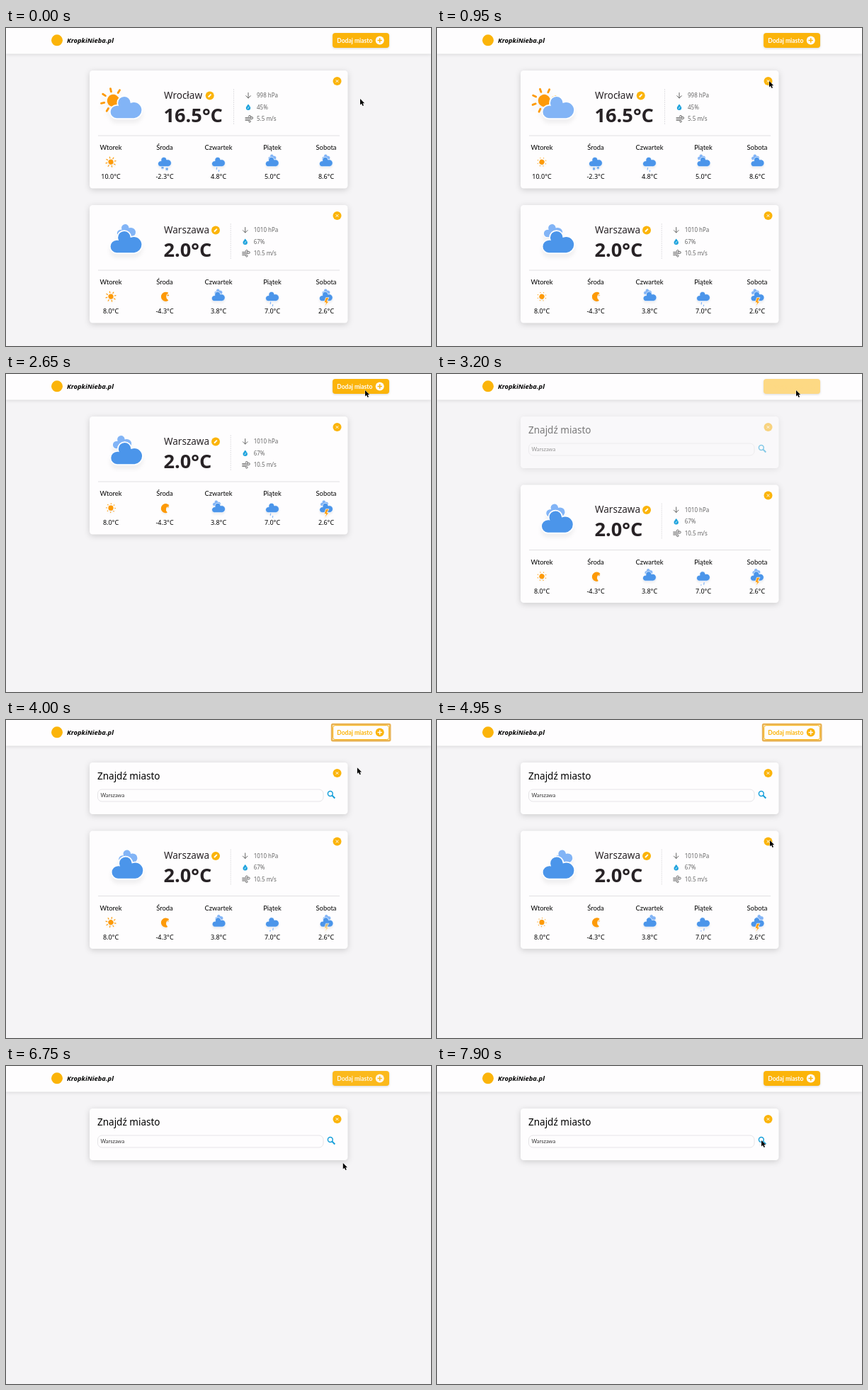
Animation of 600x449 px, one loop 8000 ms. Source, as an HTML page:

```html
<!DOCTYPE html>
<html lang="pl">
<head>
<meta charset="utf-8">
<title>Pogoda</title>
<style>
  html, body { margin: 0; width: 100%; height: 100%; overflow: hidden; background: #f5f4f6; }
  svg { display: block; width: 600px; height: 449px; }
  text { font-family: "Noto Sans", sans-serif; fill: #000; }
  .lato { font-family: Lato, sans-serif; }
  .panel { fill: #fefdfe; filter: drop-shadow(0 2px 4px rgba(0, 0, 0, .16)); }
  .head { font-size: 13.5px; }
  .big { font-size: 27.2px; font-weight: 600; fill: #272225; }
  .stat { font-size: 8px; fill: #666; }
  .day { font: 9.4px Lato, sans-serif; text-anchor: middle; }
  .temp { font-size: 9px; font-weight: 500; text-anchor: middle; }
  .rule { stroke: #e1e0e3; }
  .soft { filter: drop-shadow(0 4px 2px rgba(0, 0, 0, .05)); }
  .line { fill: none; stroke: #666; stroke-linecap: round; stroke-linejoin: round; }
</style>
</head>
<body>
<svg id="stage" viewBox="0 0 600 449"></svg>
<script>
const LOOP = 8000, STEP = 50;
const REMOVE_FIRST = 1300, OPEN_FORM = 3050, REMOVE_LAST = 6500, FADE = 300;
const AMBER = '#fbb40a', ORANGE = '#fd9a08', BLUE = '#4b95ea', PALE = '#82b4f6';

const CURSOR = [ // time, x, y
  [0, 500, 100], [100, 500, 100], [850, 469, 75], [1500, 469, 75], [1800, 474, 78],
  [2000, 474, 78], [2600, 507, 23], [3600, 507, 23], [4700, 470, 170], [5000, 470, 170],
  [5300, 468, 172], [6600, 468, 172], [6850, 480, 118], [7200, 546, 55],
  [7500, 505, 19], [7650, 505, 19], [7850, 458, 105], [8000, 458, 105]
];

// Icons are drawn on a 64-unit square.
const CLOUD = 'M47.7 35.4c0-4.6-3.7-8.2-8.2-8.2-1 0-1.9.2-2.8.5-.3-3.4-3.1-6.2-6.6-6.2-3.7 0-6.7 3-6.7 6.7 0 .8.2 1.6.4 2.3-.3-.1-.7-.1-1-.1-3.7 0-6.7 3-6.7 6.7 0 3.6 2.9 6.6 6.5 6.7h17.2c4.4-.5 7.9-4 7.9-8.4z';
const MOON = 'M14.5 13.2c0-3.7 2-6.9 5-8.7-1.5-.9-3.2-1.3-5-1.3-5.5 0-10 4.5-10 10s4.5 10 10 10c1.8 0 3.5-.5 5-1.3-3-1.7-5-5-5-8.7z';

const cloud = (fill, cls = '') =>
  `<g class="${cls}"><path d="${CLOUD}" transform="translate(0 -1)" fill="${fill}" stroke="#fff" stroke-width="1.2"/></g>`;
const backCloud = `<g class="back"><path d="${CLOUD}" transform="translate(10 1) scale(.6)" fill="${PALE}" stroke="#fff" stroke-width="1.2"/></g>`;

function sun(x, y, rayClass = '') {
  const rays = Array.from({ length: 8 }, (_, i) =>
    `<path class="${rayClass}" d="M0 9v3" transform="rotate(${i * 45})"/>`).join('');
  return `<g transform="translate(${x} ${y})"><g class="spin" stroke="${ORANGE}" stroke-width="2" stroke-linecap="round"><circle r="5" fill="${ORANGE}"/>${rays}</g></g>`;
}

const drop = (x, shift) =>
  `<path class="rain" data-shift="${shift}" d="M${x} 0v8" stroke="${PALE}" stroke-width="2" stroke-linecap="round" stroke-dasharray="4 7"/>`;
const flake = (x, delay) =>
  `<g transform="translate(${x} 45)"><path class="snow" data-delay="${delay}" d="M0-3V3M-2.6-1.5L2.6 1.5M-2.6 1.5L2.6-1.5" stroke="${BLUE}" stroke-width="1.4" stroke-linecap="round"/></g>`;

const ICONS = {
  sunny: sun(32, 32, 'ray'),
  partly: sun(19, 25) + cloud(PALE, 'front'),
  cloudy: backCloud + cloud(BLUE, 'front'),
  rainy: `<g transform="translate(34 46) rotate(10)">${drop(-6, 0)}${drop(0, 5)}</g>` + cloud(BLUE),
  snowy: flake(27, 0) + flake(37, 1200) + cloud(BLUE),
  night: `<g transform="translate(20 19)"><g class="moon"><path d="${MOON}" fill="${ORANGE}" stroke="${ORANGE}" stroke-width="2" stroke-linejoin="round"/></g>
    <path class="star" d="M20 7l.9 2 2 .9-2 .9-.9 2-.9-2-2-.9 2-.9z" fill="${ORANGE}"/></g>`,
  storm: backCloud + cloud(BLUE, 'front') +
    `<path class="bolt" d="M14.3-2.9h6.2l-4.1 7.2h3.9l-8.8 10.3 3.4-7.7h-3.8z" transform="translate(14 38) scale(1.2)" fill="${ORANGE}" stroke="#fff"/>`
};

const icon = (name, x, y, scale) =>
  `<g class="soft" transform="translate(${x} ${y}) scale(${scale})">${ICONS[name]}</g>`;

const closeButton = y =>
  `<circle cx="467.5" cy="${y}" r="6" fill="${AMBER}"/><path d="M465.7 ${y - 1.8}l3.6 3.6m0-3.6l-3.6 3.6" stroke="#fff"/>`;

function stats(x, values) {
  const rows = values.map((v, i) => `<text class="stat" x="${x + 12}" y="${38 + i * 16.5}">${v}</text>`).join('');
  return `<g class="line"><path d="M${x} 31.5v7.5m-3.3-3.3l3.3 3.3 3.3-3.3"/>
    <path d="M${x - 4} 66.5h6a1.5 1.5 0 1 0-1.5-1.5M${x - 4} 68.5h9a1.5 1.5 0 1 0-1.5-1.5M${x - 4} 70.5h6a1.3 1.3 0 1 1-1.3 1.3"/></g>
    <path d="M${x} 47.5c1.6 2.3 3.2 3.7 3.2 5.3a3.2 3.2 0 0 1-6.4 0c0-1.6 1.6-3 3.2-5.3z" fill="#18a0dc"/>
    <path d="M${x - 1.2} 54.3l2.4-3.2m-2.4.2h.3m1.8 2.8h.3" stroke="#fff" stroke-width=".8"/>${rows}`;
}

const DAYS = ['Wtorek', 'Środa', 'Czwartek', 'Piątek', 'Sobota'];

function card(id, c) {
  const days = c.days.map(([name, temp], i) => {
    const x = 148 + i * 76;
    return `<text class="day" x="${x}" y="112">${DAYS[i]}</text>${icon(name, x - 19.2, 110, .6)}
      <text class="temp" x="${x}" y="153">${temp}°C</text>`;
  }).join('');
  return `<g id="${id}"><rect class="panel" x="118" width="364.5" height="166.5" rx="4.5"/>
    ${icon(c.icon, 124, 6.5, 1.44)}
    <text class="head" x="223" y="39.5" style="fill:#272225">${c.city}</text>
    <circle cx="${c.edit}" cy="35.5" r="6" fill="${AMBER}"/>
    <path d="M${c.edit - 2} 37.5l3.8-3.8" stroke="#fff" stroke-width="1.9"/>
    <text class="big" x="222.5" y="72.5">${c.temp}°C</text>
    <path class="rule" d="M${c.split} 26v51" stroke-dasharray="2 1"/>
    <path class="rule" d="M130 92h341"/>
    ${stats(c.split + 20.5, c.stats)}${days}${closeButton(15)}</g>`;
}

const stage = document.getElementById('stage');
stage.innerHTML = `
  <rect width="600" height="449" fill="#f5f4f6"/>
  <rect width="600" height="36.5" fill="#fefdfe" style="filter:drop-shadow(0 1px 2px rgba(0,0,0,.12))"/>
  <circle cx="72" cy="17.3" r="8" fill="${AMBER}"/>
  <text x="86" y="20.8" style="font-size:9.4px;font-weight:600;font-style:italic">KropkiNieba.pl</text>
  <g style="filter:drop-shadow(0 1px 1.5px rgba(0,0,0,.14))"><rect id="btn" x="461" y="7" width="80" height="21" rx="4"/></g>
  <g id="ring" fill="none"><rect x="460" y="6" width="82.3" height="23.3" rx="1.5" stroke="#e9b354" stroke-width="2.4"/>
    <rect x="461.7" y="7.7" width="78.9" height="19.9" rx="3" stroke="${AMBER}"/></g>
  <text id="label" class="lato" x="467.3" y="20.6" style="font-size:8.5px;font-weight:700">Dodaj miasto</text>
  <circle id="disc" cx="527.7" cy="17.5" r="6"/>
  <path id="plus" d="M524.5 17.5h6.4m-3.2-3.2v6.4" stroke-width="1.5"/>
  <g id="form">
    <rect class="panel" x="118" y="60" width="364.5" height="73" rx="4.5"/>
    <text class="head" x="129" y="83.5">Znajdź miasto</text>
    <rect x="129.5" y="98" width="318.5" height="17" rx="6" fill="#fefdfe" stroke="#dfdee1" stroke-width=".8"/>
    <text class="lato" x="133.5" y="109.2" style="font-size:7.5px;fill:#333">Warszawa</text>
    <g fill="none" stroke="#159fda" stroke-width="1.5"><circle cx="457.8" cy="104" r="3.4"/><path d="M460.3 106.5l4 4" stroke-width="1.9"/></g>
    ${closeButton(75)}
  </g>
  ${card('first', {
    city: 'Wrocław', temp: '16.5', icon: 'partly', edit: 287.7, split: 321.5,
    stats: ['998 hPa', '45%', '5.5 m/s'],
    days: [['sunny', '10.0'], ['snowy', '-2.3'], ['rainy', '4.8'], ['cloudy', '5.0'], ['cloudy', '8.6']]
  })}
  ${card('last', {
    city: 'Warszawa', temp: '2.0', icon: 'cloudy', edit: 296, split: 317.2,
    stats: ['1010 hPa', '67%', '10.5 m/s'],
    days: [['sunny', '8.0'], ['night', '-4.3'], ['cloudy', '3.8'], ['rainy', '7.0'], ['storm', '2.6']]
  })}
  <path id="cursor" d="M0 0v8.6l2-1.8 1.5 3.2 1.5-.7-1.5-3.1h2.7z" fill="#000" stroke="#fff" stroke-width=".7" paint-order="stroke"/>`;

const el = id => document.getElementById(id);
const set = (node, name, value) => node.setAttribute(name, value);
const parts = {};
for (const cls of ['back', 'front', 'spin', 'ray', 'rain', 'snow', 'moon', 'star', 'bolt'])
  parts[cls] = [...stage.querySelectorAll('.' + cls)];

const clamp = v => Math.min(1, Math.max(0, v));
const ease = v => { v = clamp(v); return v * v * (3 - 2 * v); };
// 0 at the start of each period, 1 halfway through it
const swing = (t, period) => 1 - Math.abs(1 - 2 * ((t / period % 1 + 1) % 1));
const show = (node, on) => set(node, 'visibility', on ? 'visible' : 'hidden');
const blend = (a, b, p) => `rgb(${a.map((v, i) => Math.round(v + (b[i] - v) * p))})`;

function drawIcons(t) {
  const each = (cls, fn) => parts[cls].forEach(fn);
  each('back', n => set(n, 'transform', `translate(${-5 + 15 * swing(t - 1800, 7000)} 0)`));
  each('front', n => set(n, 'transform', `translate(${2 * swing(t, 3000) - .3} 0)`));
  each('spin', n => set(n, 'transform', `rotate(${t / 25 - 13})`));
  const glow = ease(swing(t, 2000));
  each('ray', n => {
    set(n, 'stroke-dasharray', `${3 - 2.9 * glow} 10`);
    set(n, 'stroke-dashoffset', -glow);
  });
  each('rain', n => set(n, 'stroke-dashoffset', -t / 80 - n.dataset.shift));
  each('snow', n => {
    const p = (t + +n.dataset.delay) % 2000 / 2000;
    set(n, 'transform', `translate(${1.4 * Math.sin(p * 5)} ${6 * p})`);
    set(n, 'opacity', clamp((1 - p) * 3));
  });
  each('moon', n => set(n, 'transform', `rotate(${15 * ease(swing(t, 6000))} 12 13)`));
  each('star', n => set(n, 'opacity', .3 + .7 * swing(t + 1500, 3000)));
  const beat = t % 1110 / 1110;
  const flash = beat < .63 ? clamp((beat - .56) / .07) : clamp((.85 - beat) / .22);
  each('bolt', n => {
    set(n, 'fill', blend([253, 154, 8], [255, 226, 150], flash));
    set(n, 'opacity', 1 - .4 * flash);
  });
}

function drawCursor(t) {
  const i = CURSOR.findIndex(k => k[0] > t);
  const [t0, x0, y0] = CURSOR[i - 1], [t1, x1, y1] = CURSOR[i];
  const p = ease((t - t0) / (t1 - t0));
  set(el('cursor'), 'transform', `translate(${x0 + (x1 - x0) * p} ${y0 + (y1 - y0) * p})`);
}

function drawPage(t) {
  const opened = t >= OPEN_FORM;
  const fade = ease((t - OPEN_FORM) / FADE);
  const focus = fade - ease((t - REMOVE_LAST) / FADE);
  show(el('form'), opened);
  set(el('form'), 'opacity', fade);
  show(el('first'), t < REMOVE_FIRST);
  set(el('first'), 'transform', 'translate(0 60)');
  show(el('last'), t < REMOVE_LAST);
  set(el('last'), 'transform', `translate(0 ${t < REMOVE_FIRST ? 250 : opened ? 156.5 : 60})`);

  const amber = [251, 180, 10], white = [254, 253, 254];
  const back = blend(amber, white, focus), ink = blend(white, amber, focus);
  set(el('btn'), 'fill', back);
  set(el('plus'), 'stroke', back);
  set(el('disc'), 'fill', ink);
  el('label').style.fill = ink;
  show(el('ring'), t >= OPEN_FORM + 250 && t < REMOVE_LAST);
}

function frame(now) {
  const t = Math.floor(now % LOOP / STEP) * STEP;
  drawIcons(t);
  drawPage(t);
  drawCursor(t);
}

const start = performance.now();
(function tick() {
  frame(performance.now() - start);
  requestAnimationFrame(tick);
})();
</script>
</body>
</html>
```
